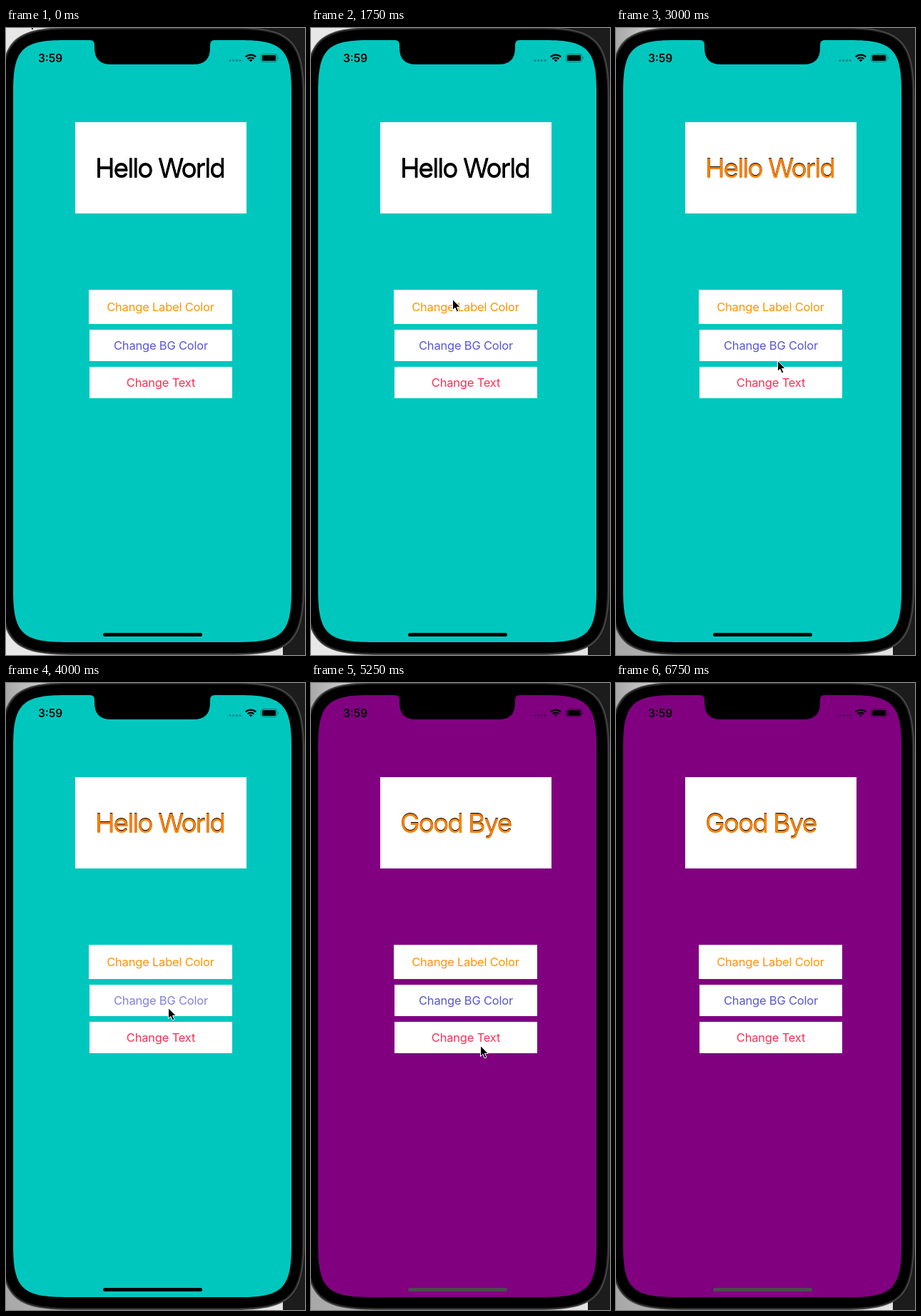
These frames come from a looping animation (419x879 px, 7250 ms). An HTML page:

```html
<!DOCTYPE html>
<html lang="en">
<head>
<meta charset="utf-8">
<title>Hello World</title>
<style>
  html, body { margin: 0; width: 100%; height: 100%; overflow: hidden; background: #1c1c1c; }
  svg { display: block; width: 419px; height: 879px; font-family: Inter, sans-serif; }
  #label text { font-size: 37px; letter-spacing: -1.95px; }
  #buttons text { font-size: 16.5px; letter-spacing: -.2px; text-anchor: middle; }
</style>
</head>
<body>
<svg viewBox="0 0 419 879">
  <defs>
    <linearGradient id="paper">
      <stop id="paperEdge" offset="0"/>
      <stop offset="1" stop-color="#e4e4e4"/>
    </linearGradient>
  </defs>

  <rect width="419" height="879" fill="#1c1c1c"/>
  <rect width="78" height="90" fill="url(#paper)"/>
  <rect y="780" width="388" height="99" fill="url(#paper)"/>

  <path id="rim" fill="#545456"/>
  <path id="band" fill="#262628"/>
  <path id="bezel"/>
  <path id="screen"/>
  <path d="M118 16V17Q124 17 124 24V28Q124 51 147 51H263Q286 51 286 28V24Q286 17 292 17V16Z"/>

  <text x="62" y="47.5" font-size="15.5" font-weight="600" text-anchor="middle">3:59</text>
  <g opacity=".3">
    <circle cx="314" cy="45.5" r="1.6"/><circle cx="318.7" cy="45.5" r="1.6"/>
    <circle cx="323.3" cy="45.5" r="1.6"/><circle cx="328" cy="45.5" r="1.6"/>
  </g>
  <g fill="none" stroke="#000" stroke-width="2.3">
    <path d="M335.8 40.5A10.4 10.4 0 0 1 350.2 40.5M338.5 43.4A6.5 6.5 0 0 1 347.5 43.4"/>
  </g>
  <path d="M343 47.6L340.5 45.1A3.6 3.6 0 0 1 345.5 45.1Z"/>
  <rect x="357.5" y="36.5" width="22" height="11" rx="3" fill="none" stroke="#000" opacity=".4"/>
  <rect x="359" y="38" width="19" height="8" rx="1.6"/>
  <path d="M381 40Q383 42 381 44Z" opacity=".45"/>

  <g id="label">
    <rect x="97" y="132" width="240" height="128" fill="#fff"/>
    <text x="125" y="208.5"></text>
    <text x="125" y="210"></text>
  </g>

  <g id="buttons">
    <rect x="116" y="367" width="201" height="48" fill="#fff"/>
    <rect x="117" y="423" width="200" height="44" fill="#fff"/>
    <rect x="117" y="475" width="200" height="44" fill="#fff"/>
    <text x="216.5" y="397" fill="#ff9500">Change Label Color</text>
    <text x="217" y="451" fill="#5856d6">Change BG Color</text>
    <text x="217" y="503" fill="#ff2d55">Change Text</text>
  </g>

  <rect id="home" x="136" y="848" width="139" height="5" rx="2.5"/>
  <path id="cursor" d="M.5 .5V15.5L3.9 12.3 6.3 18 8.9 16.9 6.5 11.3H11.2Z"
        stroke="#fff" stroke-width="1" stroke-linejoin="round"/>
</svg>

<script>
const LOOP = 7250;
const $ = id => document.getElementById(id);
const [shadow, caption] = document.querySelectorAll('#label text');
const [labelButton, bgButton] = document.querySelectorAll('#buttons text');

// Pointer steps: start time, x, y
const steps = [
  [0, 30, -15], [250, 164, 246], [500, 171, 323], [1000, 200, 386],
  [1250, 204, 414], [1500, 208, 400], [1750, 198, 380], [2000, 202, 380],
  [2250, 206, 389], [2750, 222, 449], [3000, 226, 466], [3250, 227, 455],
  [4750, 235, 493], [5000, 237, 508], [6250, 236, 524], [6500, 225, 532],
  [6750, -40, -40]
];

// Rounded rectangle with continuous corners, grown outward from the 390 x 844 screen
function roundedScreen(grow) {
  const l = 10 - grow, t = 17 - grow, r = 400 + grow, b = 861 + grow;
  const e = (47.3 + grow) * 1.52, h = e * .18;
  return `M${l} ${t + e}C${l} ${t + h} ${l + h} ${t} ${l + e} ${t}H${r - e}
    C${r - h} ${t} ${r} ${t + h} ${r} ${t + e}V${b - e}
    C${r} ${b - h} ${r - h} ${b} ${r - e} ${b}H${l + e}
    C${l + h} ${b} ${l} ${b - h} ${l} ${b - e}Z`;
}

const outlines = { rim: 18, band: 16.8, bezel: 15, screen: 0 };
for (const id in outlines) $(id).setAttribute('d', roundedScreen(outlines[id]));

function draw(now) {
  const t = now % LOOP;
  const within = (from, to) => t >= from && t < to;
  const purple = t >= 4250;

  $('screen').setAttribute('fill', purple ? '#800080' : '#00c7be');
  $('home').setAttribute('fill', purple ? '#4c4c4c' : '#000');
  $('paperEdge').setAttribute('stop-color', t < 2250 ? '#e8e8e8' : '#a8a8a8');

  shadow.textContent = caption.textContent = t < 5250 ? 'Hello World' : 'Good Bye';
  caption.setAttribute('fill', t < 2500 ? '#000' : '#ff8000');
  labelButton.setAttribute('opacity', within(2250, 2500) ? .75 : 1);
  bgButton.setAttribute('opacity', within(4000, 4250) ? .75 : 1);

  const [, x, y] = steps.findLast(step => step[0] <= t);
  $('cursor').setAttribute('transform', `translate(${x} ${y})`);
}

function tick() {
  draw(performance.now());
  requestAnimationFrame(tick);
}
tick();
</script>
</body>
</html>
```
